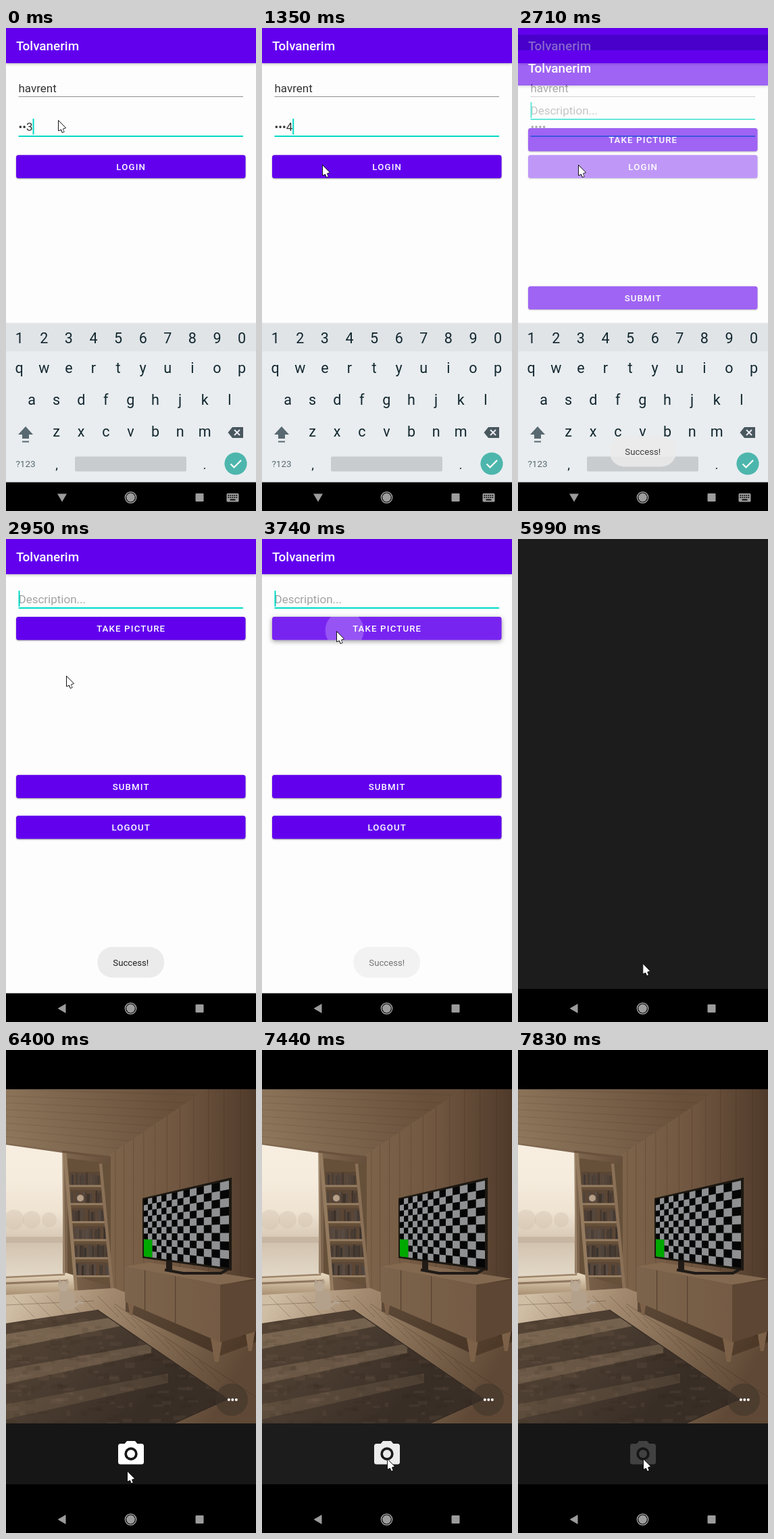
These frames come from a looping animation (370 by 714 pixels, 8 s). An HTML page with a canvas:

```html
<!DOCTYPE html>
<html lang="en">
<head>
<meta charset="utf-8">
<title>Login to camera</title>
<style>
html, body { margin: 0; width: 100%; height: 100%; overflow: hidden; background: #000; }
canvas { display: block; width: 370px; height: 714px; }
</style>
</head>
<body>
<canvas id="stage" width="370" height="714"></canvas>
<script>
const W = 370, H = 714, LOOP = 8000, STEP = 134;
const PURPLE = '#6200ee', TEAL = '#03dac5', PAPER = '#fdfdfd';
const APP = 'Tolvanerim', USER = 'havrent';
// Moments when the scene changes
const TYPED = 120, LOGIN = 690, OPENED = 2710, TAKE = 3620, DARK = 3860, CAMERA = 6400, SHUTTER = 7400;
let g = document.getElementById('stage').getContext('2d');

const clamp = v => Math.max(0, Math.min(1, v));
const mix = (a, b, u) => a + (b - a) * u;
const during = (t, from, to) => t >= from && t < to;
const gray = v => `rgb(${v},${v},${v})`;
const white = a => `rgba(255,255,255,${a})`;
const brown = a => `rgba(45,29,17,${a})`;
function random(seed) {
  return () => (seed = (seed * 16807) % 2147483647) / 2147483647;
}

function rect(x, y, w, h, fill) { g.fillStyle = fill; g.fillRect(x, y, w, h); }
function rounded(x, y, w, h, r, fill) {
  g.fillStyle = fill; g.beginPath(); g.roundRect(x, y, w, h, r); g.fill();
}
function disc(x, y, r, fill) {
  g.fillStyle = fill; g.beginPath(); g.arc(x, y, r, 0, 7); g.fill();
}
function trace(points) {
  g.beginPath();
  for (let i = 0; i < points.length; i += 2) g.lineTo(points[i], points[i + 1]);
}
function poly(points, fill) { trace(points); g.closePath(); g.fillStyle = fill; g.fill(); }
function line(points, color, width = 1) {
  trace(points); g.strokeStyle = color; g.lineWidth = width; g.stroke();
}
// Quad with two upright sides
function slab(x0, x1, top0, base0, top1, base1, fill) {
  poly([x0, top0, x1, top1, x1, base1, x0, base0], fill);
}
function ramp(x0, y0, x1, y1, ...colors) {
  const grad = g.createLinearGradient(x0, y0, x1, y1);
  colors.forEach((c, i) => grad.addColorStop(i / (colors.length - 1), c));
  return grad;
}
function text(s, x, y, size, fill, { weight = 400, align = 'left', spacing = 0 } = {}) {
  g.font = `${weight} ${size}px Roboto, sans-serif`;
  g.textAlign = align;
  g.letterSpacing = spacing + 'px';
  g.fillStyle = fill;
  g.fillText(s, x, y);
  g.letterSpacing = '0px';
}

function header() {
  g.save();
  g.shadowColor = 'rgba(0,0,0,.3)'; g.shadowBlur = 4; g.shadowOffsetY = 1;
  rect(0, 0, W, 52, PURPLE);
  g.restore();
  rect(0, -23, W, 23, '#3700b3');
  text(APP, 15, 33, 18.9, '#fff', { weight: 500 });
}

// age: time since the touch; the ripple drifts to the centre, grows and fades
function button(label, y, age = -1, touchX = 0) {
  const fade = age < 0 ? 0 : clamp((660 - age) / 260);
  const shape = () => { g.beginPath(); g.roundRect(15, y, 339.5, 34.3, 3.5); };
  g.save();
  g.shadowColor = 'rgba(0,0,0,.4)';
  g.shadowBlur = 2 + 5 * fade; g.shadowOffsetY = 1 + fade;
  shape(); g.fillStyle = PURPLE; g.fill();
  g.restore();
  if (fade) {
    const drift = clamp(age / 800);
    g.save();
    shape(); g.clip();
    rect(15, y, 340, 35, white(.14 * fade * clamp(age / 120)));
    disc(mix(touchX, 185, drift), y + 20, 8 + .17 * age, white(.22 * fade));
    g.restore();
  }
  text(label, 185.2, y + 22, 13.2, '#fff', { weight: 500, align: 'center', spacing: 1.18 });
}

function loginScreen(t) {
  rect(0, 0, W, H, PAPER);
  header();
  text(USER, 18.5, 94.5, 17, '#333');
  rect(18.5, 101, 332.5, 1, '#8f8f8f');
  const secret = t < TYPED ? '••3' : t < OPENED ? '•••4' : '••••';
  text(secret, 18.5, 152, 17, '#333');
  const end = 18.5 + g.measureText(secret).width;
  rect(18.5, 159, 332.5, 2, TEAL);
  if (t < OPENED && !during(t, LOGIN, 1080)) rect(end, 134, 2, 23.5, TEAL);
  button('LOGIN', 187.7, t - LOGIN, 90);
}

function postScreen(t) {
  rect(0, -23, W, H + 23, PAPER);
  header();
  text('Description...', 18.5, 94.5, 17, '#a3a3a3');
  rect(18.5, 101, 332.5, 2, TEAL);
  if (!during(t, 3230, 3480)) rect(18.5, 76.5, 2, 23.5, TEAL);
  button('TAKE PICTURE', 115, t - TAKE, 111);
  button('SUBMIT', 348.7);
  button('LOGOUT', 409);
}

function keyboard() {
  const ink = '#586971';
  rect(0, 435, W, 2, '#f0f1f2');
  rect(0, 436.5, W, 235, '#e9edf0');
  rect(0, 437, W, 41, '#e0e4e7');
  ['1234567890', 'qwertyuiop', 'asdfghjkl', 'zxcvbnm'].forEach((keys, row) => {
    const x = 19.7 + 18.3 * [0, 0, 1, 3][row], y = row ? 463 + 47 * row : 466;
    [...keys].forEach((k, i) => text(k, x + i * 36.6, y, 21.5, '#12272f', { align: 'center' }));
  });
  text(',', 75, 651.5, 19, '#12272f', { align: 'center' });
  text('.', 294, 651.5, 19, '#12272f', { align: 'center' });
  text('?123', 29, 649, 13.5, ink, { align: 'center' });
  poly([29, 589, 40, 601, 18, 601], ink);
  rect(24, 600, 10, 7, ink);
  rect(24, 610.5, 10, 2, ink);
  poly([328.5, 598, 335, 590, 351, 590, 351, 606, 335, 606], '#49575f');
  line([338, 594, 346, 602], '#e9edf0', 1.9);
  line([346, 594, 338, 602], '#e9edf0', 1.9);
  rounded(102, 633.5, 165, 22, 2, '#c8ccce');
  disc(340, 644, 16.6, '#4db6ac');
  line([332.5, 644.5, 337.5, 649.5, 348, 639], '#fff', 2.2);
}

function toast(alpha) {
  g.save();
  g.globalAlpha = alpha;
  rounded(135.5, 603, 98.5, 45.5, 22, '#ebebeb');
  text('Success!', 184.8, 631, 13.2, '#1f1f1f', { align: 'center' });
  g.restore();
}

function navBar(typing) {
  const tone = '#9c9c9c';
  rect(0, 671.5, W, 43, '#000');
  g.save();
  g.translate(83, 694);
  if (typing) g.rotate(-Math.PI / 2);
  poly([-6.5, 0, 5.5, -7, 5.5, 7], tone);
  g.restore();
  disc(184.5, 694, 6.4, tone);
  g.beginPath(); g.arc(184.5, 694, 8.2, 0, 7);
  g.strokeStyle = '#b8b8b8'; g.lineWidth = 1.2; g.stroke();
  rounded(280.5, 688, 12, 12, 1, tone);
  if (!typing) return;
  rounded(326.5, 688, 18, 12.5, 1.5, tone);
  for (let i = 0; i < 10; i++) rect(328.5 + (i % 5) * 3, i < 5 ? 690 : 693, 1.7, 1.7, '#000');
  rect(331.5, 696.5, 8, 1.8, '#000');
}

function walls() {
  // The ceiling fills the space above both walls.
  rect(0, 58, W, 494, ramp(0, 140, 240, 58, '#8f775c', '#7a624b', '#684f3a'));
  for (let i = 1; i < 9; i++) line([0, 138 - i * 10, 150 + i * 17, 157 - i * 11.3], brown(.13));
  slab(150, W, 157, 352, 8, 430, ramp(150, 0, W, 0, '#7e644a', '#705640', '#4f3a2a'));
  for (let i = 0; i < 12; i++) {
    const x = 162 + i * (12 + i * .65);
    line([x, 157 - (x - 150) * .68, x, 352 + (x - 160) * .34], brown(.2));
  }
  slab(0, 155, 138, 364, 157, 352, ramp(80, 0, 155, 0, '#806750', '#664f3b'));
  slab(0, 101, 334, 364, 329, 357, ramp(0, 334, 0, 364, '#e1d1b8', '#a58b6d'));
  line([0, 345, 92, 341], '#8e765d', 3);
  slab(0, 84, 140, 335, 152, 331, ramp(0, 141, 0, 335, '#f7eee0', '#f6ecdd', '#efe3d2', '#d3c4b0', '#e3d8c8'));
  for (let i = 0; i < 3; i++) disc(12 + i * 26, 251, 15 - i * 2, 'rgba(205,190,170,.35)');
  rect(0, 276, 85, 9, 'rgba(175,156,133,.4)');
  line([84.5, 152, 86, 332, 0, 336], '#9d866c', 2.5);
}

function bookcase() {
  const rnd = random(71);
  slab(91, 155, 160, 330, 168, 350, '#665039');
  for (let i = 0; i < 6; i++) {
    const y = 201 + i * 26.7, x = 94 + i * 1.6, right = 143 + i * 2.5;
    rect(x, y - 21, right - x, 21, '#5b4635');
    for (let b = x + 1; b < right - 4;) {
      const w = 2 + rnd() * 3, h = 15 + rnd() * 5;
      if (rnd() < .83) rect(b, y - h, w - .5, h, `hsl(25 ${10 + rnd() * 10}% ${19 + rnd() * 12}%)`);
      b += w;
    }
    line([x - 2, y, right + 1, y], '#967d62', 3);
  }
  disc(110, 219, 5, '#b7a088');
  line([87, 151, 104, 357], '#947b5f', 5);
  line([140, 168, 157, 352], '#8a7056', 4.5);
  line([83, 150, 143, 158], '#69523d', 3);
}

function floor() {
  poly([0, 362, 160, 352, W, 430, W, 552, 0, 552], ramp(20, 360, 320, 520, '#cfbda4', '#a48b70', '#7f674f', '#5f4936'));
  for (let i = 0; i < 12; i++) {
    const x = 10 + i * 25, y = 363 + Math.max(0, i - 5) * 16;
    line([x, y, x + 32, y + 32], brown(.25));
  }
  line([0, 377, 130, 371], brown(.3));
  line([160, 375, W, 513], brown(.3));
}

function rug() {
  const rnd = random(19);
  g.save();
  trace([0, 404, 135, 384, 328, 516, 248, 552, 0, 552]); g.closePath(); g.clip();
  rect(0, 384, W, 168, ramp(0, 390, 180, 552, '#544435', '#4a3c30', '#392e26'));
  // Sunlight falls in bands that weaken towards the viewer.
  for (let i = 0; i < 3; i++) {
    const y = 420 + i * 52;
    slab(0, 190 + i * 25, y, y + 22, y - 30 - i * 8, y - 16 - i * 8, `rgba(160,136,108,${.5 - i * .15})`);
  }
  for (let i = 0; i < 230; i++) {
    const shade = rnd() < .5 ? '160,135,108' : '35,27,21';
    rect(rnd() * 310, 390 + rnd() * 162, 5 + rnd() * 15, 3 + rnd() * 5, `rgba(${shade},.09)`);
  }
  g.restore();
  line([135, 384, 328, 516, 248, 552], '#342a23', 1.5);
}

function cat() {
  const fur = '#b3a18c';
  rounded(79, 353, 23, 31, [8, 14, 4, 4], fur);
  disc(85, 349, 8, '#baa994');
  for (const x of [77, 88]) poly([x, 346, x + 2, 338, x + 6, 344], fur);
  line([100, 380, 108, 373, 115, 374], fur, 4);
}

function cabinet() {
  slab(177, 317, 372, 386, 432, 452, brown(.55));
  slab(317, W, 432, 452, 416, 432, brown(.4));
  const leg = (x, y, h) => poly([x, y, x + h / 2, y, x + h / 3, y + h, x + h / 6, y + h], '#7c6148');
  leg(180, 372, 20); leg(303, 426, 35); leg(354, 416, 29);
  poly([176, 320, 212, 314, W, 338, 317, 347], '#836950');
  slab(176, 317, 320, 372, 347, 432, ramp(176, 0, 317, 0, '#7c634b', '#755b45'));
  slab(317, W, 347, 432, 340, 416, '#5d4633');
  for (const u of [.21, .53]) line([mix(176, 317, u), mix(320, 347, u), mix(176, 317, u), mix(372, 432, u)], '#4f3b2b');
}

function television() {
  const cols = 14, rows = 10, left = 84, right = 129;
  // Perspective: equal columns widen as the nearer edge is reached.
  const depth = u => u / (u + (1 - u) * right / left);
  const patch = (c, r, w, h, fill) => {
    const a = depth(c / cols), b = depth((c + w) / cols);
    const y = (k, row) => mix(221, 193, k) + mix(left, right, k) * row / rows;
    slab(204 + 126 * a, 204 + 126 * b, y(a, r), y(a, r + h), y(b, r), y(b, r + h), fill);
  };
  rect(237, 310, 9, 15, '#211b17');
  line([235, 325, 262, 330, 318, 330, 330, 323], '#1f1a17', 4);
  slab(202, 334, 219, 307.5, 188.5, 326, '#1d1812');
  patch(0, 0, cols, rows, '#060606');
  for (let c = 0; c < cols; c++)
    for (let r = 0; r < rows; r++)
      if ((c + r) % 2) patch(c, r, 1, 1, '#8f9092');
  patch(0, 7, 2, 3, '#00a800');
}

function layer() {
  const canvas = document.createElement('canvas');
  canvas.width = W; canvas.height = H;
  return canvas.getContext('2d');
}
function drawOn(target, draw) {
  const main = g;
  g = target; g.save(); draw(); g.restore(); g = main;
}

const room = layer(), entering = layer();
drawOn(room, () => {
  g.beginPath(); g.rect(0, 58, W, 494); g.clip();
  [walls, bookcase, floor, rug, cat, cabinet, television].forEach(draw => draw());
  disc(334, 517, 24, 'rgba(62,51,43,.55)');
  for (let i = -1; i < 2; i++) disc(335.3 + i * 5.5, 517, 2, '#fff');
});

function cameraScreen(t) {
  const u = clamp((t - SHUTTER) / 400);
  const bar = gray(22 + 18 * Math.sin(Math.PI * u)), icon = gray(mix(255, 65, u));
  rect(0, 0, W, H, '#000');
  g.drawImage(room.canvas, 0, 0);
  rect(0, 552, W, 90, bar);
  rounded(166, 582, 38, 30.5, 3.5, icon);
  poly([174, 584, 179, 578, 191, 578, 196, 584], icon);
  disc(185, 597, 9.7, bar);
  disc(185, 597, 6, icon);
}

// Each move: start, number of held steps, end point, easing power
const moves = [
  [120, 3, 89, 202, 1], [3230, 3, 110, 136, 1], [4710, 1, 111, 140, 1],
  [4860, 5, 200, 642, 3.3], [5720, 4, 179, 622, 1], [6800, 3, 185, 604, 1]
];
function pointer(t) {
  let x = 77, y = 136;
  for (const [start, steps, toX, toY, power] of moves) {
    const u = clamp((Math.floor((t - start) / STEP) + 1) / steps) ** power;
    x = mix(x, toX, u); y = mix(y, toY, u);
  }
  g.save();
  g.translate(x + .5, y + .5);
  g.lineJoin = 'round';
  line([4, 11, 7.4, 18], '#111', 4);
  poly([0, 0, 0, 15.5, 11, 11.2], '#fff');
  g.strokeStyle = '#111'; g.lineWidth = 1; g.stroke();
  line([4, 10, 7.2, 17.2], '#fff', 2.2);
  g.restore();
}

function render(t) {
  const phase = Math.floor((t - OPENED) / 120);
  if (phase < 2) loginScreen(t);
  if (during(t, OPENED, 4010)) {
    const slide = phase < 2 ? 33 / 4 ** phase : 0;
    drawOn(entering, () => {
      g.clearRect(0, 0, W, H);
      g.translate(0, slide);
      postScreen(t);
    });
    g.globalAlpha = Math.min(1, .6 + .4 * phase);
    g.drawImage(entering.canvas, 0, 0);
    g.globalAlpha = 1;
  }
  if (phase < 2) {
    g.save(); g.translate(0, 110 * Math.max(0, phase)); keyboard(); g.restore();
  }
  if (during(t, OPENED, 4010)) toast(Math.min(clamp((t - 2480) / 270), clamp((4010 - t) / 450)));
  if (during(t, DARK, CAMERA)) {
    rect(0, 0, W, t < 4010 ? 154 : 665, '#1c1c1c');
    if (t >= 4010) rect(0, 665, W, 49, '#000');
  }
  if (t >= CAMERA) cameraScreen(t);
  navBar(phase < 1);
  pointer(t);
}

const start = performance.now();
function tick() {
  render((performance.now() - start) % LOOP);
  requestAnimationFrame(tick);
}
tick();
</script>
</body>
</html>
```
